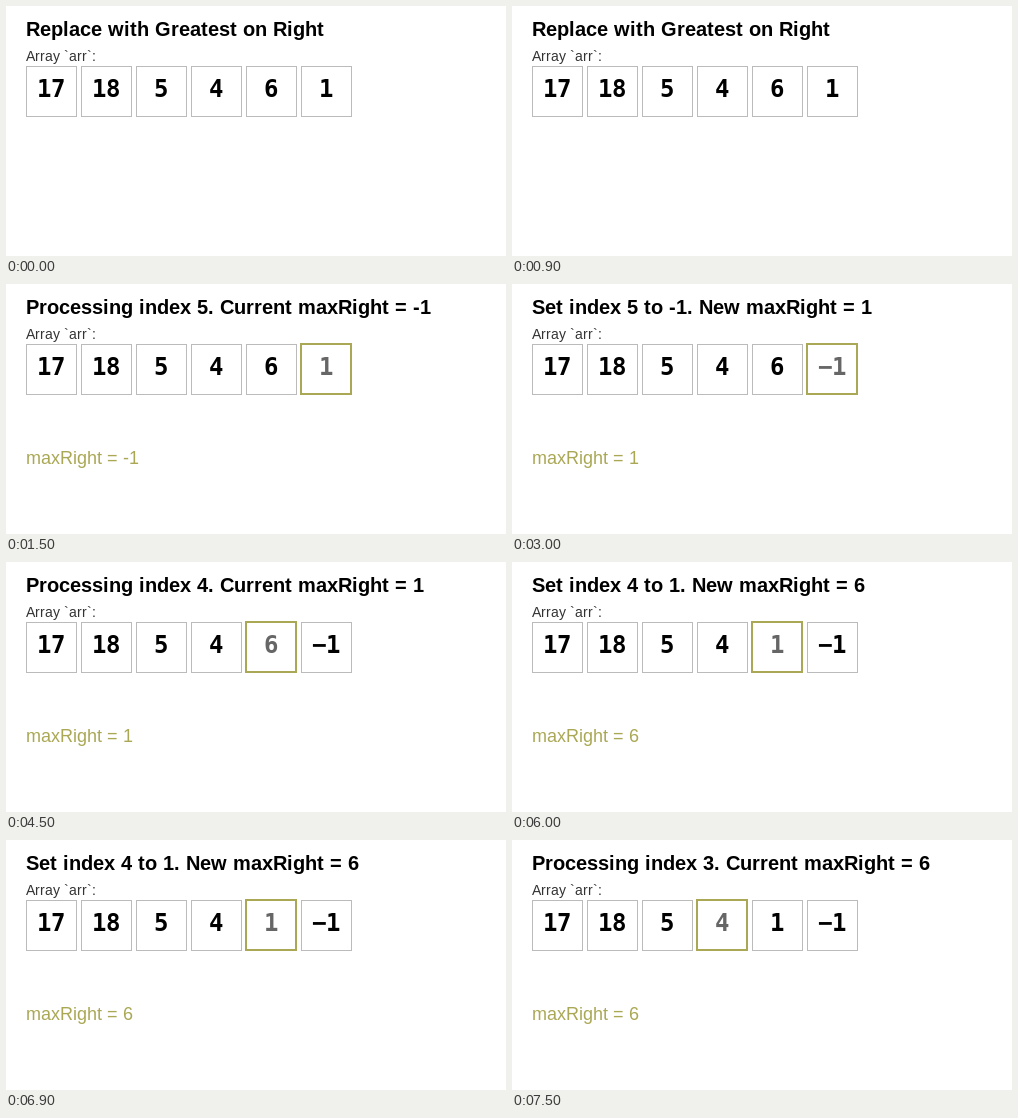
An HTML page with a canvas that plays this animation: 500 px wide and 250 px high, repeating every 8 s.

```html
<!DOCTYPE html>
<html lang="en">
<head>
<meta charset="utf-8">
<title>Replace with Greatest on Right</title>
<style>
  html, body { margin: 0; width: 100%; height: 100%; overflow: hidden; background: #fff; }
  canvas { display: block; }
</style>
</head>
<body>
<canvas id="stage" width="500" height="250"></canvas>
<script>
const LOOP = 8000, STEP = 1500;
const SANS = '"Liberation Sans", Arial, sans-serif';
const MONO = '"DejaVu Sans Mono", monospace';
const ACCENT = "#aaa855";
const start = [17, 18, 5, 4, 6, 1];
const ctx = document.getElementById("stage").getContext("2d");

// Each index takes two steps: inspect it, then overwrite it.
function stateAt(step) {
  const arr = [...start];
  let maxRight = -1, active = -1, title = "Replace with Greatest on Right";
  for (let s = 1; s <= step; s++) {
    if (s % 2) {
      active = arr.length - (s + 1) / 2;
      title = `Processing index ${active}. Current maxRight = ${maxRight}`;
    } else {
      const old = arr[active];
      arr[active] = maxRight;
      title = `Set index ${active} to ${maxRight}. New maxRight = `;
      maxRight = Math.max(maxRight, old);
      title += maxRight;
    }
  }
  return { arr, maxRight, active, title };
}

// Letters advance by whole pixels, so every glyph sits on the pixel grid.
function write(text, x, y, font, color, centered = false) {
  ctx.font = font;
  ctx.fillStyle = color;
  const advances = [...text].map(c => Math.round(ctx.measureText(c).width));
  if (centered) x -= advances.reduce((a, b) => a + b) / 2;
  [...text].forEach((c, i) => {
    ctx.fillText(c, x, y);
    x += advances[i];
  });
}

function drawCell(value, i, active) {
  const x = 20 + 55 * i;
  const inset = active ? 0 : 0.5;  // keeps both line widths on whole pixels
  ctx.lineWidth = active ? 2 : 1;
  ctx.strokeStyle = active ? ACCENT : "#bbb";
  ctx.strokeRect(x + inset, 60 + inset, 50, 50);
  write(String(value).replace("-", "\u2212"), x + 25, 91, `bold 24px ${MONO}`,
    active ? "#666" : "#000", true);
}

function draw(step) {
  const { arr, maxRight, active, title } = stateAt(step);
  ctx.clearRect(0, 0, 500, 250);
  write(title, 20, 30, `bold 20px ${SANS}`, "#000");
  write("Array `arr`:", 20, 55, `14px ${SANS}`, "#333");
  arr.forEach((value, i) => drawCell(value, i, i === active));
  if (step) write(`maxRight = ${maxRight}`, 20, 180, `18px ${SANS}`, ACCENT);
}

const began = performance.now();
let shown = -1;
function tick() {
  const step = Math.floor((performance.now() - began) % LOOP / STEP);
  if (step !== shown) draw(shown = step);
  requestAnimationFrame(tick);
}
tick();
</script>
</body>
</html>
```
